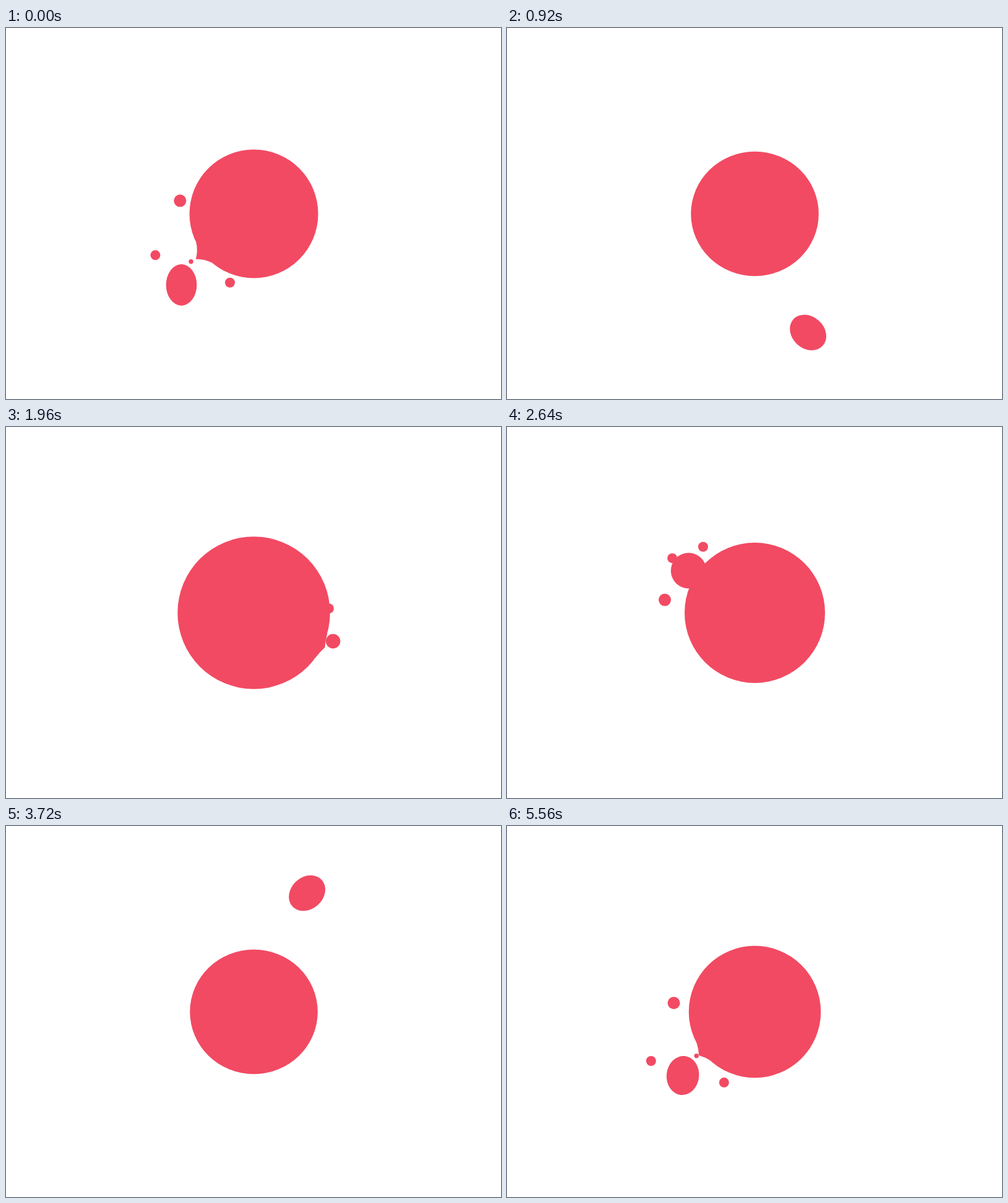
Animation, 800 px wide and 600 px high, one loop 5.6 s. Source, as an HTML page with a canvas:

```html
<!DOCTYPE html>
<html lang="en">
<head>
<meta charset="utf-8">
<title>Orbiting drop</title>
<style>
html, body { margin: 0; width: 100%; height: 100%; overflow: hidden; background: #fff; }
canvas { display: block; }
</style>
</head>
<body>
<canvas id="stage" width="800" height="600"></canvas>
<script>
const ctx = document.getElementById('stage').getContext('2d');
const RED = '#f24a63', WHITE = '#fff';
const STEP = 40, LOOP = 5600, HALF = LOOP / 2, LEAD = 760;
const CX = 400.5, CY = 300.5, TAU = Math.PI * 2, DEG = Math.PI / 180;

const ramp = (t, from, to) => Math.min(1, Math.max(0, (t - from) / (to - from)));
const smooth = x => x * x * (3 - 2 * x);
const pulse = (t, mid, reach) =>
  Math.abs(t - mid) < reach ? Math.cos(Math.PI / 2 * (t - mid) / reach) ** 2 : 0;

// Times count from the moment the drop is at the far left of its orbit.
// Each splash throws droplets on elliptical loops: base point, outward and sideways vectors, size.
const splashes = [
  { start: -260, span: 460, angle: 142, mid: 20, reach: 120, height: 16, width: 12,
    loops: [[329, 395.3, 25, 19, -45, 9, 8], [307, 360, -73, 17, -22, 45, 8], [278.5, 321, -6, -37, -43, 31, 10]] },
  { start: 1620, span: 400, angle: 26, mid: 1820, reach: 200, height: 22.5, width: 15,
    loops: [[490, 365, 15, 30, 40, 0, 9.7], [500, 350, 68, 30, -36, 24, 11.7], [510, 315, 46, -18, -6, 44, 8]] }
];
const bubbles = [[447, 301, 7.3], [422, 301, 4.7], [450, 312, 4.3]];

function ellipse(x, y, rx, ry = rx, turn = 0) {
  ctx.beginPath();
  ctx.ellipse(x, y, rx, ry, turn, 0, TAU);
  ctx.fill();
}

function bodySize(t) {
  if (t < 0) {
    const shed = ramp(t, -360, 22);
    return 102 + 15.8 * (1 - shed * shed) + 3.7 * (1 - ramp(t, -760, -160));
  }
  return 102 + 2 * (1 - ramp(t, 0, 80))
    + 26 * smooth(ramp(t, 1500, 1740)) - 6.5 * ramp(t, 1740, 2040);
}

function drawBody(t) {
  const size = bodySize(t);
  const wobble = 8.5 * ramp(t, 0, 150) * Math.exp(-t / 480) * Math.cos(TAU * (t - 160) / 380);
  const rx = size + wobble, ry = size - wobble;
  ellipse(CX, CY, rx, ry);
  for (const { angle, mid, reach, height, width } of splashes) {
    const force = pulse(t, mid, reach);
    if (!force) continue;
    const tip = height * force, spread = width * (.6 + .4 * force);
    const at = (turn, scale, extra = 0) => {
      const a = (angle + turn) * DEG;
      return [CX + (rx * scale + extra) * Math.cos(a), CY + (ry * scale + extra) * Math.sin(a)];
    };
    const lift = 1 + .04 * force;
    ctx.beginPath();
    ctx.moveTo(CX, CY);
    ctx.lineTo(...at(-spread, 1));
    ctx.quadraticCurveTo(...at(-4.5, lift), ...at(0, 1, tip));
    ctx.quadraticCurveTo(...at(4.5, lift), ...at(spread, 1));
    ctx.fill();
  }
}

// Half a turn below the body, then the arc leads back into its centre
function drawDrop(t) {
  const a = Math.PI * Math.min(Math.max(t, -600), 1800) / 1200;
  const stretch = 1 + .1 * ramp(t, -160, -40) * Math.cos(TAU * (t - 80) / 560) + .1 * pulse(t, 20, 180);
  const r = 28.8;
  ellipse(CX - .5 - 116.5 * Math.cos(a), CY + 115 + 115 * Math.sin(a), r * stretch, r / stretch,
    Math.atan2(Math.cos(a), Math.sin(a)));
}

function drawDroplets(t) {
  for (const { start, span, loops } of splashes) {
    const turn = TAU * ramp(t, start, start + span);
    const out = (1 - Math.cos(turn)) / 2, side = Math.sin(turn) / 2;
    const scale = Math.min(1, 2.5 * Math.abs(Math.sin(turn / 2)));
    for (const [x, y, ox, oy, sx, sy, r] of loops) {
      ellipse(x + ox * out + sx * side, y + oy * out + sy * side, r * scale);
    }
  }
  // Bead pinched off between body and drop
  ellipse(299 - .18 * t, 377.7 + .15 * t, 4 * Math.sqrt(pulse(t, -20, 80)));
}

function drawBubbles(t) {
  for (const [x, y, r] of bubbles) {
    ellipse(x - .15 * (t - 1800), y, r * pulse(t, 1800, 130));
  }
}

function draw(now) {
  const time = Math.floor(now / STEP) * STEP % LOOP + LEAD;
  const t = time % HALF - LEAD;
  const mirrored = Math.floor(time / HALF) % 2 === 1;
  ctx.setTransform(1, 0, 0, 1, 0, 0);
  ctx.fillStyle = WHITE;
  ctx.fillRect(0, 0, 800, 600);
  if (mirrored) ctx.setTransform(1, 0, 0, -1, 0, 2 * CY);
  ctx.fillStyle = RED;
  drawBody(t);
  drawDrop(t);
  drawDroplets(t);
  ctx.fillStyle = WHITE;
  drawBubbles(t);
}

const start = performance.now();
function tick() {
  draw(performance.now() - start);
  requestAnimationFrame(tick);
}
tick();
</script>
</body>
</html>
```
